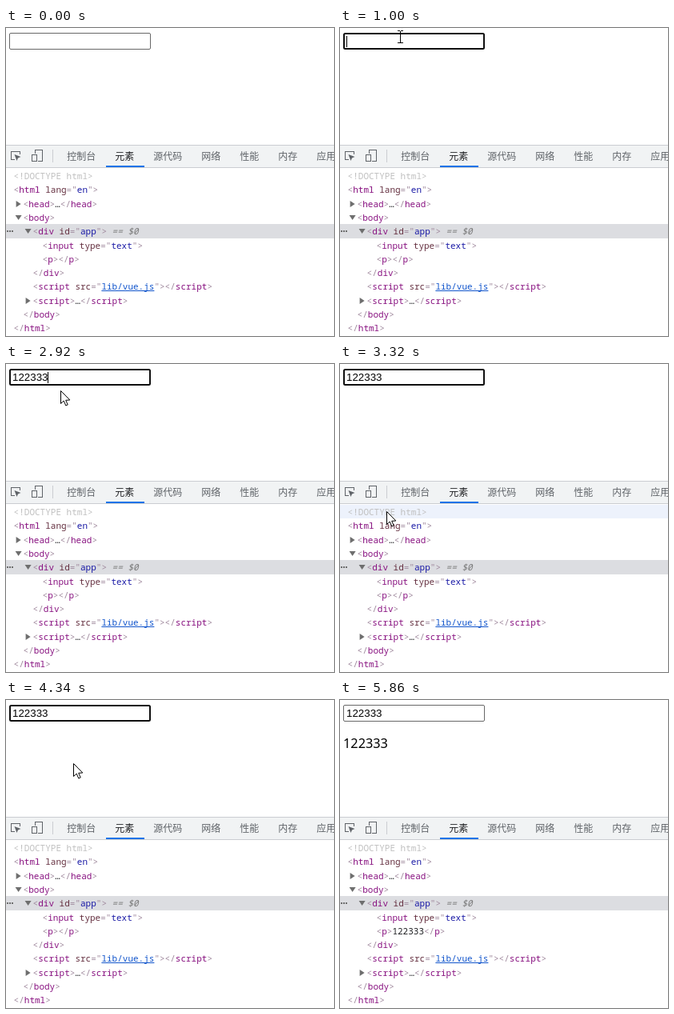
Animation of 410 by 385 pixels, one loop 6060 ms. Source, as an HTML page with a canvas:

```html
<!DOCTYPE html>
<html lang="zh">
<head>
<meta charset="utf-8">
<style>
html, body { margin: 0; width: 100%; height: 100%; overflow: hidden; background: #fff; }
canvas { display: block; width: 410px; height: 385px; }
</style>
</head>
<body>
<canvas id="stage"></canvas>
<script>
const W = 410, H = 385, LOOP = 6060;
const canvas = document.getElementById('stage');
const dpr = window.devicePixelRatio || 1;
canvas.width = W * dpr;
canvas.height = H * dpr;
const ctx = canvas.getContext('2d');

const MONO = '11px "Noto Sans Mono", monospace';
const TABS = '12px "Noto Sans CJK SC", "Noto Sans CJK", sans-serif';
const FIELD = '13.333px "Liberation Sans", Arial, sans-serif';
const PARA = '16.3px "Noto Sans", sans-serif';

const STEP = 100;                      // the screen is sampled this often
const FOCUS = 1000, BLUR = 4640, FADE = 820;
const TYPED = '122333', FIRST_KEY = 1720, KEY_GAP = 200, BLINK = 510;
const ROW_TOP = 176.3, ROW_H = 17.29;

// Pointer stops: time, x, y.
const stops = [
  [0, 165, 400], [500, 75, 11], [FOCUS, 75, 11], [1100, 69.5, 16],
  [2820, 69.5, 16], [3320, 58, 184], [3640, 80, 287], [4040, 80, 287],
  [4340, 84, 79], [5360, 84, 79], [5860, 165, 400]
];

const ink = {
  d: '#c0c0c0', b: '#a08a9e', t: '#881280', a: '#653040',
  v: '#1a1aa6', l: '#1155cc', k: '#202124', i: '#777777'
};

// Indent, then runs split by "~" whose first letter picks the colour.
const rows = [
  [0, 'd<!DOCTYPE html>'],
  [0, 'b<~thtml~b ~alang~b="~ven~b">'],
  [1, 'b<~thead~b>~k…~b</~thead~b>', 'right'],
  [1, 'b<~tbody~b>', 'down'],
  [2, 'b<~tdiv~b ~aid~b="~vapp~b">~i == $0', 'down'],
  [3, 'b<~tinput~b ~atype~b="~vtext~b">'],
  [3, 'b<~tp~b></~tp~b>'],
  [2, 'b</~tdiv~b>'],
  [2, 'b<~tscript~b ~asrc~b="~llib/vue.js~b"></~tscript~b>'],
  [2, 'b<~tscript~b>~k…~b</~tscript~b>', 'right'],
  [1, 'b</~tbody~b>'],
  [0, 'b</~thtml~b>']
];
const SELECTED = 4, PARA_ROW = 6;
const tabs = ['控制台', '元素', '源代码', '网络', '性能', '内存', '应用'];

const held = ms => Math.floor(ms / STEP) * STEP;
const ease = u => u * u * (3 - 2 * u);
const lerp = (a, b, u) => a + (b - a) * u;

function pointerAt(t) {
  const n = stops.findIndex(stop => stop[0] > t);
  if (n < 0) return stops[stops.length - 1].slice(1);
  const [t0, x0, y0] = stops[n - 1], [t1, x1, y1] = stops[n];
  const u = ease(held(t - t0) / (t1 - t0));
  return [lerp(x0, x1, u), lerp(y0, y1, u)];
}

function box(color, x, y, w, h) {
  ctx.fillStyle = color;
  ctx.fillRect(x, y, w, h);
}

function label(str, x, y, font, color) {
  ctx.font = font;
  ctx.fillStyle = color;
  ctx.fillText(str, x, y);
  return ctx.measureText(str).width;
}

function shape(points, fill, stroke) {
  ctx.beginPath();
  points.forEach(([x, y]) => ctx.lineTo(x, y));
  ctx.closePath();
  ctx.fillStyle = fill;
  ctx.fill();
  if (stroke) {
    ctx.strokeStyle = stroke;
    ctx.lineWidth = 1;
    ctx.stroke();
  }
}

function mix(from, to, k) {
  return 'rgb(' + from.map((c, i) => Math.round(lerp(c, to[i], k))).join(',') + ')';
}

function drawField(t) {
  const focused = t >= FOCUS && t < BLUR;
  const line = focused ? 2 : 1;
  ctx.beginPath();
  ctx.roundRect(4 + line / 2, 6 + line / 2, 177 - line, 21 - line, 1.5);
  ctx.lineWidth = line;
  ctx.strokeStyle = focused ? '#101010' : '#686868';
  ctx.stroke();

  const presses = Math.floor((t - FIRST_KEY) / KEY_GAP) + 1;
  const count = Math.max(0, Math.min(TYPED.length, presses));
  const width = label(TYPED.slice(0, count), 8, 21, FIELD, '#000');
  const lastKey = count ? FIRST_KEY + (count - 1) * KEY_GAP : FOCUS;
  if (focused && (t - lastKey) % (2 * BLINK) < BLINK) {
    box('#000', Math.round(7.6 + width), 10, 1, 14);
  }
  if (t >= BLUR) label(TYPED, 4, 60, PARA, '#000');
}

function drawToolbar() {
  box('#f1f3f4', 0, 146, W, 29);
  box('#cacdd1', 0, 146, W, 1);
  box('#cacdd1', 0, 174, W, 1);
  box('#1a73e8', 125, 172, 48, 2);
  box('#cacdd1', 58, 152, 1, 16);

  ctx.strokeStyle = '#5f6368';
  ctx.lineWidth = 1;
  ctx.strokeRect(6.5, 154.5, 11, 10);
  box('#f1f3f4', 11, 158, 8, 8);
  shape([[10.5, 158], [18.5, 161], [15, 162.5], [13.5, 166]], '#5f6368');
  ctx.strokeRect(36.5, 152.5, 9, 14);
  box('#f1f3f4', 32, 157, 8, 11);
  ctx.strokeRect(32.5, 158.5, 6, 8);

  let x = 76.2;
  for (const name of tabs) {
    x += 24 + label(name, x, 164.5, TABS, name === '元素' ? '#202124' : '#5f6368');
  }
}

function drawTriangle(dir, x, y) {
  if (dir === 'down') shape([[x - 4, y - 3], [x + 4, y - 3], [x, y + 3]], '#6e6e6e');
  else shape([[x - 3, y - 4], [x + 3, y], [x - 3, y + 4]], '#6e6e6e');
}

function drawRuns(runs, x, base, heat) {
  runs.split('~').forEach((run, n) => {
    const kind = run[0], text = run.slice(1);
    ctx.font = (kind === 'i' ? 'italic ' : '') + MONO;
    const w = ctx.measureText(text).width;
    let color = ink[kind];
    if (heat > 0 && (kind === 'k' || n === 1)) {
      const tone = kind === 'k' ? [32, 33, 36] : [136, 18, 128];
      box(mix([255, 255, 255], tone, heat), x, base - 11, w, 14);
      if (heat > 0.6) color = mix([32, 33, 36], [255, 255, 255], (heat - 0.6) / 0.4);
    }
    ctx.fillStyle = color;
    ctx.fillText(text, x, base);
    if (kind === 'l') box(color, x, base + 1, w, 1);
    x += w;
  });
}

function drawTree(t, hover) {
  const filled = t >= BLUR;
  const heat = filled ? 1 - Math.min(1, held(t - BLUR) / FADE) ** 1.5 : 0;
  rows.forEach(([depth, runs, arrow], i) => {
    const top = Math.round(ROW_TOP + i * ROW_H);
    const base = Math.round(ROW_TOP + 12.8 + i * ROW_H);
    const x = 9.6 + depth * 12;
    if (i === SELECTED) {
      box('#dcdde1', 0, top, W, 18);
      for (let d = 0; d < 3; d++) box('#6e6e6e', 1 + d * 3, top + 8, 2, 2);
    } else if (i === hover) {
      box('#edf2fc', 0, top, W, 17);
    }
    if (arrow) drawTriangle(arrow, x - 6, base - 4);
    if (filled && i === PARA_ROW) drawRuns(`b<~tp~b>~k${TYPED}~b</~tp~b>`, x, base, heat);
    else drawRuns(runs, x, base, 0);
  });
}

function drawBeam(x, y) {
  const cx = Math.floor(x), cy = Math.round(y);
  box('#000', cx, cy - 7, 1, 15);
  for (const edge of [cy - 8, cy + 7]) {
    box('#000', cx - 3, edge, 3, 1);
    box('#000', cx + 1, edge, 3, 1);
  }
}

function drawPointer(x, y) {
  const outline = [[0, 0], [0, 16], [3.7, 12.6], [6.3, 18.5], [8.7, 17.4], [6.2, 11.8], [11.3, 11.5]];
  shape(outline.map(([px, py]) => [x + 0.5 + px, y + 0.5 + py]), '#fff', '#000');
}

function draw(t) {
  const [px, py] = pointerAt(t);
  const hover = Math.floor((py - ROW_TOP) / ROW_H);
  ctx.setTransform(dpr, 0, 0, dpr, 0, 0);
  box('#fff', 0, 0, W, H);
  drawField(t);
  drawToolbar();
  drawTree(t, hover);
  if (py < 27) drawBeam(px, py);
  else drawPointer(Math.round(px), Math.round(py));
}

const start = performance.now();
function tick() {
  draw((performance.now() - start) % LOOP);
  requestAnimationFrame(tick);
}
tick();
</script>
</body>
</html>
```
